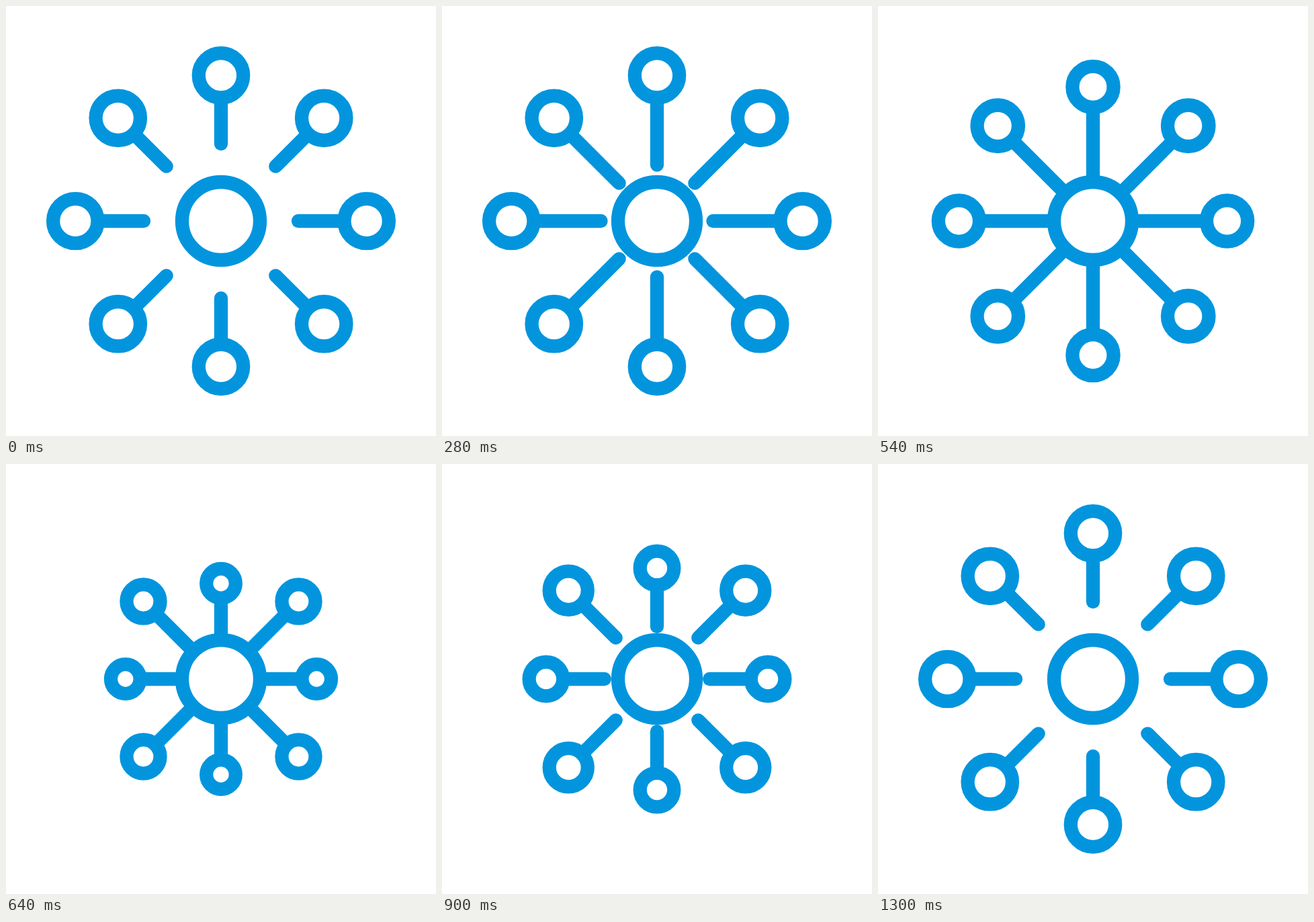
Write an HTML page with a canvas that moves like this. It is 640x640 px and loops after 1.64 s.

```html
<!DOCTYPE html>
<html lang="en">
<head>
<meta charset="utf-8">
<title>Hub and nodes</title>
<style>
  html, body { margin: 0; width: 100%; height: 100%; overflow: hidden; background: #fff; }
  canvas { display: block; width: 640px; height: 640px; }
</style>
</head>
<body>
<canvas id="stage" width="640" height="640"></canvas>
<script>
const ctx = document.getElementById("stage").getContext("2d");
const LOOP = 1640;
const HUB_RADIUS = 58;
const NODE_DISTANCE = 216.7;
const NODE_RATIO = 0.1533;   // node radius relative to its distance
const SPOKE_REST = 115;
const SPOKE_DOCKED = 59;

// Times are in animation steps of 30 ms.
const START = 1;
const STRAIGHT = { docked: 15.8, pull: 16.3, turn: 21.8, end: 42.4, nearest: 138.2 };
const DIAGONAL = { docked: 14.7, pull: 15.6, turn: 22.5, end: 37.6, nearest: 156.6 };

const mix = (a, b, p) => a + (b - a) * p;

function ease(step, from, to) {
  const p = Math.min(1, Math.max(0, (step - from) / (to - from)));
  return (1 - Math.cos(Math.PI * p)) / 2;
}

// Steps are shown on a 20 ms grid, so they last 40 and 20 ms in turn.
function stepAt(ms) {
  return 2 * Math.floor(ms / 60) + (ms % 60 >= 40 ? 1 : 0);
}

function ring(x, radius) {
  ctx.beginPath();
  ctx.arc(x, 0, radius, 0, 2 * Math.PI);
  ctx.stroke();
}

function arm(step, kind) {
  const release = ease(step, kind.turn, kind.end);
  const pull = ease(step, kind.pull, kind.turn) - release;
  const dock = ease(step, START, kind.docked) - release;
  const distance = mix(NODE_DISTANCE, kind.nearest, pull);
  const radius = distance * NODE_RATIO;

  ctx.beginPath();
  ctx.moveTo(mix(SPOKE_REST, SPOKE_DOCKED, dock), 0);
  ctx.lineTo(distance - radius - 1, 0);
  ctx.stroke();
  ring(distance, radius);
}

function draw(ms) {
  const step = stepAt(ms);
  ctx.setTransform(1, 0, 0, 1, 0, 0);
  ctx.fillStyle = "#fff";
  ctx.fillRect(0, 0, 640, 640);
  ctx.translate(320, 320);
  ctx.strokeStyle = "#0295de";
  ctx.lineWidth = 20.3;
  ctx.lineCap = "round";
  ring(0, HUB_RADIUS);
  for (let i = 0; i < 8; i++) {
    arm(step, i % 2 ? DIAGONAL : STRAIGHT);
    ctx.rotate(Math.PI / 4);
  }
}

const began = performance.now();
function tick() {
  draw((performance.now() - began) % LOOP);
  requestAnimationFrame(tick);
}
tick();
</script>
</body>
</html>
```
